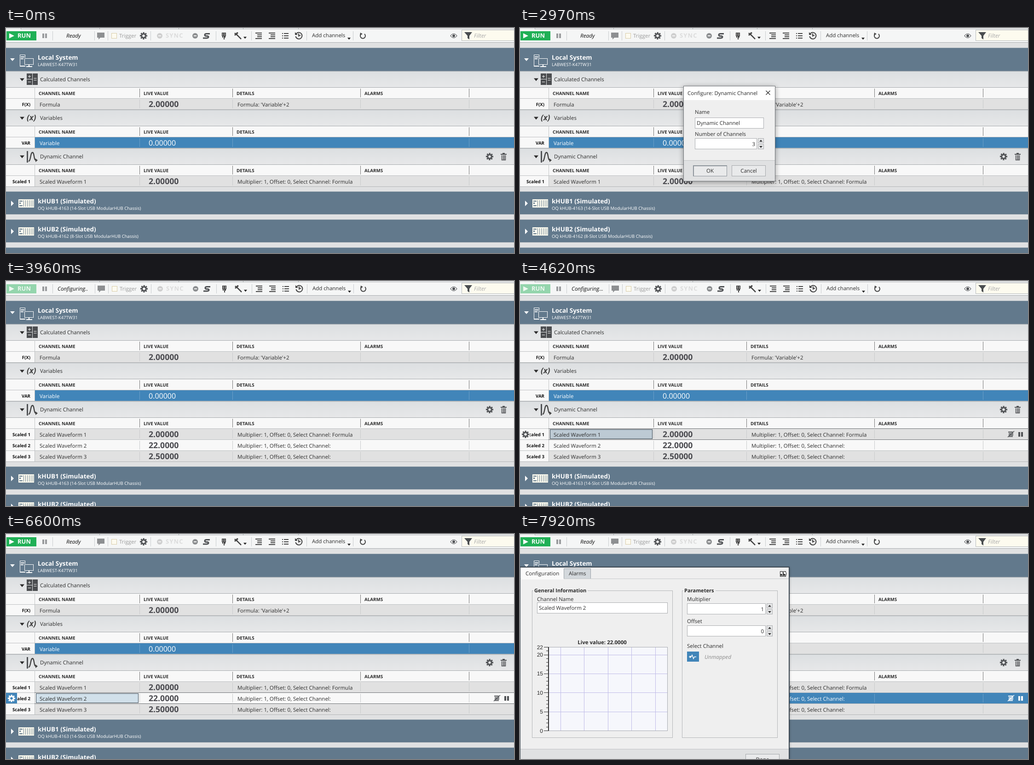
Recreate the animation shown at these times as an HTML page. Size 1104 by 490 pixels, loop 8 s.

```html
<!DOCTYPE html>
<html lang="en">
<head>
<meta charset="utf-8">
<title>Channel list</title>
<style>
html, body { margin: 0; width: 100%; height: 100%; overflow: hidden; background: #e0e1e2; }
svg { display: block; width: 1104px; height: 490px; }
rect { shape-rendering: crispEdges; }
text { font-family: "Open Sans", "Noto Sans", sans-serif; text-rendering: geometricPrecision; white-space: pre; }
.b { font-weight: 700; }
.i { font-style: italic; }
.axis { font-family: "Liberation Sans", Arial, sans-serif; }
</style>
</head>
<body>
<svg id="stage" viewBox="0 0 1104 490"></svg>
<script>
const LOOP = 8000;
const INK = '#2b2b2b', ICON = '#505255', SLATE = '#62798c', BLUE = '#4185b9', PALE = '#f8f8f8', GREY = '#e1e1e1';

const rect = (x, y, w, h, fill, extra = '') =>
  `<rect x="${x}" y="${y}" width="${w}" height="${h}" fill="${fill}" ${extra}/>`;
const box = (x, y, w, h, fill, edge) => rect(x, y, w, h, edge) + rect(x + 1, y + 1, w - 2, h - 2, fill);
const path = (d, fill = INK, extra = '') => `<path d="${d}" fill="${fill}" ${extra}/>`;
const line = (d, color = ICON, w = 1.5) => path(d, 'none', `stroke="${color}" stroke-width="${w}"`);
const disc = (x, y, r, fill) => `<circle cx="${x}" cy="${y}" r="${r}" fill="${fill}"/>`;
const text = (x, y, s, { size = 11.5, color = INK, cls = '', anchor = 'start', extra = '' } = {}) =>
  `<text x="${x}" y="${y}" font-size="${size}" fill="${color}" class="${cls}" text-anchor="${anchor}" ${extra}>${s}</text>`;
// Content visible only between the given pairs of times.
const during = (times, s) => `<g data-t="${times.join(' ')}">${s}</g>`;
const group = (id, s) => `<g id="${id}">${s}</g>`;

const gear = (x, y, color = ICON) =>
  `<g fill="none" stroke="${color}" transform="translate(${x} ${y})">
    <circle r="4.4" stroke-width="3.2"/>
    <circle r="6.7" stroke-width="2.8" stroke-dasharray="2.9 2.36" transform="rotate(-12)"/></g>`;
const bars = (x, y, color) => rect(x, y, 4, 10, color) + rect(x + 6, y, 4, 10, color);
const down = (x, y, w, h, color = INK) => path(`M${x} ${y}h${w}l${-w / 2} ${h}z`, color);
const minus = (x, y, color) => disc(x, y, 6, color) + rect(x - 3, y - 1, 6, 2, '#f5f5f5');
const rowIcons = (y, color = ICON) =>
  line(`M1061 ${y + 8}h10M1062 ${y + 11.5}h10M1062 ${y + 14.5}h10M1062 ${y + 17.5}h9`, color, 2) +
  line(`M1060 ${y + 19}L1074 ${y + 6}`, color, 1.5) + bars(1083, y + 8, color);

/* Toolbar */
function toolbar() {
  const sep = x => rect(x, 7, 1, 20, '#c9cccf');
  const list = (x, indent) => [0, 1, 2, 3].map(k =>
    rect(x + (k % 3 ? indent : 0), 10 + k * 4, 14 - (k % 3 ? indent : 0), 2, '#454545')).join('');
  const run = (fill, ink) => rect(1, 7, 65, 20, fill) + path('M7 11.5l11 5.5-11 5.5z', ink) +
    text(25, 21, 'RUN', { size: 13, color: ink, cls: 'b' });
  const status = (x, s) => text(x, 21, s, { size: 11.8, cls: 'i', color: '#111' });
  const tools =
    [192, 221, 314, 456, 533, 653, 754].map(sep).join('') +
    path('M198 10h16v11h-9l-4 4v-4h-3z', '#8d8f91') +
    box(229, 11, 12, 12, '#fdfbf0', '#d9cda9') +
    text(246, 21, 'Trigger', { color: '#9a9a9a' }) + gear(299, 17) +
    minus(334, 17, '#cfcfcf') +
    text(347, 21, 'SYNC', { size: 13, color: '#dcdcdc', cls: 'b', extra: 'letter-spacing="1.1"' }) +
    minus(411, 17, '#8d8f91') +
    line('M443 12.5h-7q-4 0-4 2.5t3 2.5h2q3 0 3 2t-4 2.500h-8', ICON, 3) +
    rect(469, 10, 9, 8, '#454545') + rect(471, 11, 1, 6, '#ddd') + rect(475, 11, 1, 6, '#ddd') +
    rect(470, 18, 2, 3, '#454545') + rect(475, 18, 2, 3, '#454545') + rect(472.5, 18, 2, 7, '#454545') +
    line('M500 13L511 24', '#454545', 2.5) + line('M497 16l6-6M497 11l3 3 4-4', '#454545', 2.5) +
    down(516, 19, 7, 4.5) +
    list(542, 4) + list(571, 4) +
    [11, 16, 21].map(y => rect(600, y, 2, 2, '#454545') + rect(604, y, 10, 2, '#454545')).join('') +
    line('M630.500 13a7 7 0 1 1-1 5M636 12v5.500l4-2', '#454545', 2) + path('M628 9v6h6z', '#454545') +
    text(665, 20, 'Add channels') + down(742, 21, 7, 4.5) +
    line('M772 13a5.500 5.500 0 1 0 7 0', '#454545', 2) + path('M769 16l1-6 5 3z', '#454545');
  return rect(0, 0, 1104, 31, '#f5f6f6') + rect(0, 0, 1104, 2, '#e3e5e6') + rect(32, 2, 1072, 1, '#c3c6c8') +
    [32, 203, 375, 515, 635].map(x => rect(x, 0, 1, 3, '#a8acaf')).join('') +
    rect(0, 31, 1104, 1, '#a9adb0') +
    during([0, 3630, 5280, LOOP], run('#20b056', '#fff')) +
    during([3630, 5280], run('#94d5ad', '#eef8f1')) +
    bars(79, 12, '#999b9d') + sep(101) +
    during([0, 3630, 4950, LOOP], status(131, 'Ready')) +
    [[3630, 3960], [3960, 4620], [4620, 4950]].map((t, k) => during(t, status(112, 'Configuring' + '.'.repeat(k + 1)))).join('') +
    group('tools', tools) +
    path('M966 17q7-9 14 0q-7 9-14 0z', '#fff', 'stroke="#505255" stroke-width="1.2"') + disc(973, 17, 3, ICON) +
    box(990, 4, 116, 24, '#fdfbef', '#b9bcbe') +
    path('M996 9h17l-6 8v8l-4-3v-5z', '#4a4d50') +
    text(1017, 21, 'Filter', { size: 12, color: '#aaa', cls: 'i' });
}

/* Channel list */
const block = (y, h = 50) => rect(0, y, 1104, h, SLATE) + rect(0, y, 1104, 1, '#8696a3') + rect(0, y + h - 1, 1104, 1, '#7d8d9a');
const heading = (y, title, sub) =>
  text(69, y + 26, title, { size: 13.5, color: '#fff', cls: 'b' }) +
  text(69, y + 40, sub, { size: 9.6, color: '#fff' });

function system() {
  return block(43, 51) + down(9, 66, 10, 6, '#fff') +
    path('M30 58h12v7h-1v-6h-10v23h11v2h-12z', '#fff') + rect(32, 62, 8, 2, '#fff') + rect(32, 66, 6, 2, '#fff') +
    box(40, 66, 20, 14, SLATE, '#fff') + rect(49, 80, 2, 3, '#fff') + rect(44, 83, 13, 2, '#fff') +
    heading(43, 'Local System', 'LABWEST-K47TW31');
}

function chassis(y, name, sub) {
  let slots = rect(27, y + 17, 34, 18, '#fffdf0') + rect(29, y + 20, 7, 2, SLATE) +
    rect(29, y + 24, 3, 3, SLATE) + rect(29, y + 30, 7, 2, SLATE);
  for (let x = 38; x < 60; x += 4) slots += rect(x, y + 19, 1, 14, SLATE);
  return block(y) + path(`M11 ${y + 20}l6 6-6 6z`, '#fff') + slots + heading(y, name, sub);
}

const section = (y, title) => rect(0, y, 1104, 36, 'url(#bar)') + rect(0, y, 1104, 1, '#b9bdc0') +
  down(30, y + 15.5, 10, 6) + text(74, y + 22, title);

function columns(y, names) {
  const xs = [71, 299, 501, 779];
  return rect(0, y, 1104, 25, PALE) + rect(0, y, 1104, 1, '#a6aaad') + rect(62, y, 1, 24, '#c4c6c8') +
    names.map((s, k) => text(xs[k], y + 17, s, { size: 9.8, cls: 'b' }) +
      (k ? rect(xs[k] - 9, y + 3, 1, 19, '#777') : '')).join('') + rect(1006, y + 3, 1, 19, '#777');
}

function row(y, label, name, value, details, { fill = GREY, color = INK, strong = true, alarms = true } = {}) {
  const chosen = fill === BLUE, edge = chosen ? '#6b9fc8' : '#c9cbcc';
  return rect(0, y, 62, 24, PALE) + rect(62, y, 1042, 24, fill) + rect(0, y, 1104, 1, '#bdc0c2') +
    rect(0, y + 24, 1104, 1, '#b3b6b8') + rect(62, y, 1, 24, '#bdc0c2') +
    [290, 492, ...(alarms ? [770] : []), 1006].map(x => rect(x, y + 3, 1, 19, edge)).join('') +
    text(53, y + 17, label, { size: 9.7, cls: 'b', anchor: 'end', color: '#111' }) +
    text(73, y + 18, name, { color }) +
    text(310, y + 19, value, strong ? { size: 17.6, cls: 'b', color: chosen ? color : '#4a4a4f' } : { size: 16, color }) +
    text(503, y + 18, details, { color });
}

const HEADS = ['CHANNEL NAME', 'LIVE VALUE', 'DETAILS', 'ALARMS'];
const waveform = (k, value, source = '', style) =>
  row(321 + 24 * (k - 1), `Scaled ${k}`, `Scaled Waveform ${k}`, value,
    `Multiplier: 1, Offset: 0, Select Channel:${source}`, style);

function hover(k, tint) {
  const y = 321 + 24 * (k - 1);
  return rect(62, y, 1042, 1, '#6d7073') + rect(62, y + 24, 1042, 1, '#6d7073') +
    box(65, y + 2, 223, 21, tint, '#3c4a56') + text(73, y + 18, `Scaled Waveform ${k}`) +
    rect(4, y + 4, 17, 17, PALE) + gear(12, y + 13) + rowIcons(y);
}

function list() {
  const variable = style => row(237, 'VAR', 'Variable', '0.00000', '', { strong: false, alarms: false, ...style });
  const chosen = { fill: BLUE, color: '#fff' };
  return system() +
    section(94, 'Calculated Channels') +
    rect(45, 99, 24, 25, '#4b4d50') + rect(57, 99, 1, 25, '#e3e5e6') + rect(45, 111, 12, 1, '#e3e5e6') +
    line('M48 105.500h6M51 102.500v6M48 117.500h6M60.500 109.500h6M60.500 113.500h6', '#fff', 1) +
    columns(129, HEADS) + row(153, 'F(X)', 'Formula', '2.00000', "Formula: 'Variable'+2") +
    section(178, 'Variables') + text(45, 201, '(x)', { size: 17, color: '#444', cls: 'b i' }) +
    columns(213, HEADS.slice(0, 3)) +
    during([0, 6930], variable(chosen)) + during([6930, LOOP], variable()) +
    section(262, 'Dynamic Channel') + rect(45, 268, 3, 25, ICON) +
    line('M49 290C54 290 53 271 57.500 271S60 288 65 288', '#444', 2.4) + path('M64 284l5 4-5 4z', '#444') +
    during([990, 1320], rect(1040, 269, 22, 22, BLUE)) + gear(1051, 280) +
    during([990, 1320], gear(1051, 280, '#fff')) +
    rect(1075, 274, 13, 2, ICON) + rect(1079, 272, 5, 2, ICON) +
    line('M1077.500 277v10.500h8v-10.500M1080.500 277v10M1083 277v10', ICON, 1.5) +
    columns(297, HEADS) + waveform(1, '2.00000', ' Formula') +
    during([3960, LOOP],
      during([3960, 6930], waveform(2, '22.0000', '', { fill: PALE })) + waveform(3, '2.50000') +
      during([6930, LOOP], waveform(2, '22.0000', '', chosen) + rowIcons(345, '#fff'))) +
    during([4620, 4950], hover(1, '#bdcad4')) +
    during([4950, 5280, 6270, 6930], hover(2, '#d1e0ea')) +
    during([5280, 6270], hover(3, '#bdcad4')) +
    during([6600, 6930], rect(0, 346, 24, 23, BLUE) + gear(12, 358, '#fff')) +
    group('lower',
      chassis(356, 'kHUB1 (Simulated)', 'OQ kHUB-4163 (14-Slot USB ModularHUB Chassis)') +
      chassis(417, 'kHUB2 (Simulated)', 'OQ kHUB-4162 (8-Slot USB ModularHUB Chassis)') + block(478));
}

/* Windows */
const EDGE = '#abadb0';
const spinner = (x, y) => [0, 13].map(d => box(x, y + d, 13, 11, '#e6e7e8', EDGE) +
  path(d ? `M${x + 3} ${y + 17}h7l-3.500 4z` : `M${x + 3} ${y + 7.5}h7l-3.500-4z`)).join('');
const field = (x, y, w, s = '') => box(x, y, w, 24, '#fff', EDGE) + text(x + 4, y + 16, s);
const number = (x, y, s) => text(x, y, s, { anchor: 'end' });
const button = (x, y, s, fill = '#e9eaeb', edge = '#a5a8ab') =>
  box(x, y, 74, 24, fill, edge) + text(x + 37, y + 16, s, { anchor: 'middle' });

function dialog() {
  const ok = (fill, edge) => button(376, 299, 'OK', fill, edge) +
    rect(377, 300, 72, 22, 'none', `stroke="${edge}"`);
  return rect(355, 128, 200, 208, '#000', 'filter="url(#soft)" opacity=".38"') +
    box(355, 126, 200, 208, '#efefef', '#6f7377') + rect(356, 127, 198, 30, '#fff') +
    text(364, 146, 'Configure: Dynamic Channel') + line('M534.500 136.500l9 9M543.500 136.500l-9 9', '#222', 1.2) +
    text(380, 187, 'Name') + field(380, 195, 150, 'Dynamic Channel') +
    text(380, 235, 'Number of Channels') + field(380, 240, 135) +
    [[1320, 2310], [2310, 2640], [2640, 3630]].map((t, k) => during(t, number(511, 256.500, k + 1))).join('') +
    spinner(517, 240) +
    during([1980, 2970], box(517, 240, 13, 11, '#c5dcec', BLUE) + path('M520 247.500h7l-3.500-4z')) +
    rect(356, 288, 198, 45, '#e0e1e2') + rect(356, 288, 198, 1, '#bfc2c4') +
    ok('#e9eaeb', '#8d949b') + during([3300, 3630], ok('#c5dcec', BLUE)) + button(460, 299, 'Cancel');
}

function chart() {
  const yAt = v => 428 - v * 182 / 22;
  let s = box(62, 246, 259, 183, '#f6f7fc', '#a9abb2');
  for (let k = 0; k < 5; k++) s += rect(Math.round(88 + k * 51.4), 247, 1, 181, '#bfbbe8');
  for (let v = 5; v <= 20; v += 5) s += rect(63, Math.round(yAt(v)), 257, 1, '#bfbbe8');
  for (let v = 0; v <= 22; v++) {
    const major = v % 5 === 0 || v === 22, len = major ? 10 : 5;
    s += rect(62 - len, Math.round(yAt(v)), len, 1, '#333');
    if (major) s += text(50, yAt(v) + 4.500, v, { size: 12, cls: 'axis', anchor: 'end' });
  }
  return s + rect(61, 246, 2, 183, '#333');
}

function popup() {
  const frame = (x, w, title, tw) => rect(x + .5, 123.5, w, 320, 'none', 'stroke="#b4b6b8"') +
    rect(x + 3, 118, tw, 10, '#efefef') + text(x + 5, 127, title, { size: 11.1, cls: 'b' });
  const param = (y, s, v) => text(363, y, s) + field(363, y + 5, 171) + number(530, y + 22, v) + spinner(536, y + 5);
  const map = (fill, edge, ink) => box(363, 256, 26, 22, fill, edge) +
    line('M367 267.500h5l2-4 3 8 2-4h4', ink, 1.5) + path('M369 264.500v6l4-3z', ink);
  return rect(-4, 73, 590, 430, '#000', 'filter="url(#edge)" opacity=".4"') +
    rect(0, 71, 586, 419, '#3f4a54') + rect(1, 73, 583, 417, '#efefef') +
    box(95, 75, 59, 23, '#d3d8dc', '#9ba2a8') + rect(1, 97, 583, 1, '#c6c9cb') + rect(2, 74, 93, 25, '#fafafa') +
    text(12, 90, 'Configuration') + text(106, 90, 'Alarms') +
    [568, 575].map(x => `<rect x="${x - 3}" y="81" width="6" height="12" rx="3" fill="#fff" stroke="#222"/>` + disc(x, 89, 2, '#222')).join('') +
    frame(26, 305, 'General Information', 118) + text(37, 146, 'Channel Name') + field(37, 149, 284, 'Scaled Waveform 2') +
    text(178.500, 240, 'Live value: 22.0000', { cls: 'b', anchor: 'middle' }) + chart() +
    frame(352, 207, 'Parameters', 70) + param(146, 'Multiplier', 1) + param(194, 'Offset', 0) +
    text(363, 248, 'Select Channel') +
    during([6930, 7590], map('#e6e7e8', EDGE, ICON)) +
    during([7590, 7920], map('#c5dcec', BLUE, ICON)) +
    during([7920, LOOP], map(BLUE, BLUE, '#fff')) +
    text(401, 272, 'Unmapped', { size: 11.8, color: '#8d8d8d', cls: 'i' }) +
    rect(1, 469, 583, 21, '#e0e1e2') + rect(1, 468, 583, 1, '#c0c3c5') + button(490, 479, 'Done');
}

const stage = document.getElementById('stage');
stage.innerHTML = `<defs>
  <linearGradient id="bar" x2="0" y2="1"><stop stop-color="#dcdfe1"/><stop offset="1" stop-color="#e7e8e9"/></linearGradient>
  <filter id="soft" x="-20%" y="-20%" width="140%" height="140%"><feGaussianBlur stdDeviation="6"/></filter>
  <filter id="edge"><feGaussianBlur stdDeviation="2"/></filter></defs>` +
  rect(0, 0, 1104, 490, '#e0e1e2') + toolbar() + list() +
  during([1320, 3630], dialog()) + during([6930, LOOP], popup());

const parts = [...stage.querySelectorAll('[data-t]')].map(el => ({ el, times: el.dataset.t.split(' ').map(Number) }));
const tools = document.getElementById('tools'), lower = document.getElementById('lower');

function render(now) {
  const t = now % LOOP;
  for (const { el, times } of parts) {
    // An odd count of passed switch times means the part is on.
    el.style.display = times.filter(x => x <= t).length % 2 ? '' : 'none';
  }
  tools.setAttribute('transform', `translate(${t >= 3630 && t < 4950 ? 1 : 0} 0)`);
  lower.setAttribute('transform', `translate(0 ${t >= 3960 ? 48 : 0})`);
}
function tick() {
  render(performance.now());
  requestAnimationFrame(tick);
}
tick();
</script>
</body>
</html>
```
